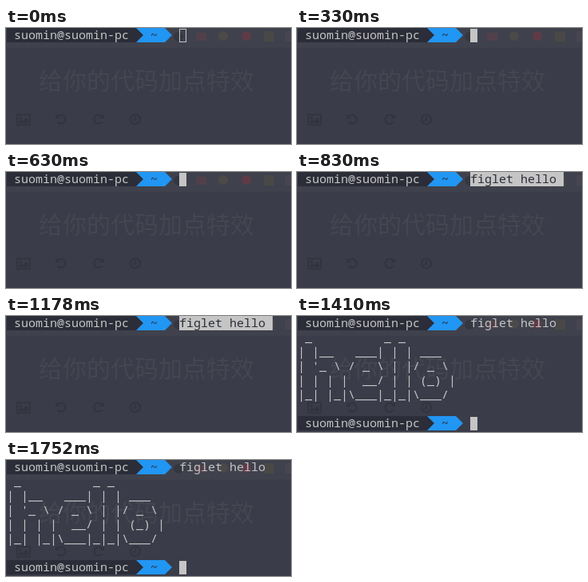
Animation of 357 by 146 pixels, one loop 1980 ms. Source, as an HTML page with a canvas:

```html
<!DOCTYPE html>
<html lang="zh">
<head>
<meta charset="utf-8">
<title>Terminal</title>
<style>
html, body { margin: 0; width: 100%; height: 100%; overflow: hidden; background: #3a3c49; }
canvas { display: block; }
</style>
</head>
<body>
<canvas id="stage" width="357" height="146"></canvas>
<script>
const ctx = document.getElementById('stage').getContext('2d');
const LOOP = 1980;
const CELL = 9, ROW = 18, LEFT = 1;
const MONO = '300 15px "Noto Sans Mono", monospace';
const FG = '#c5c5c5', BG = '#3a3c49', DARK = '#2b2d38', BLUE = '#2196f3';
const FAINT = '#444651', ICON = '#32343f';
const COMMAND = 'figlet hello';
const BANNER = [
  ' _          _ _',
  '| |__   ___| | | ___',
  "| '_ \\ / _ \\ | |/ _ \\",
  '| | | |  __/ | | (_) |',
  '|_| |_|\\___|_|_|\\___/'
];

const colX = col => LEFT + col * CELL;

function rect(x, y, w, h, color) {
  ctx.fillStyle = color;
  ctx.fillRect(x, y, w, h);
}

function disc(x, y, r, color) {
  ctx.fillStyle = color;
  ctx.beginPath();
  ctx.arc(x, y, r, 0, Math.PI * 2);
  ctx.fill();
}

function poly(color, ...points) {
  ctx.fillStyle = color;
  ctx.beginPath();
  points.forEach(([x, y]) => ctx.lineTo(x, y));
  ctx.fill();
}

// One character per terminal cell
function type(text, col, row, color = FG) {
  ctx.font = MONO;
  ctx.fillStyle = color;
  [...text].forEach((ch, i) => {
    if (ch !== ' ') ctx.fillText(ch, colX(col + i), row * ROW + 14);
  });
}

function arrow(col, y, color) {
  const x = colX(col);
  poly(color, [x, y], [x + CELL, y + ROW / 2], [x, y + ROW]);
}

function prompt(row) {
  const y = row * ROW;
  rect(LEFT, y, 18 * CELL, ROW, DARK);
  rect(colX(18), y, 4 * CELL, ROW, BLUE);
  arrow(18, y, DARK);
  arrow(22, y, BLUE);
  type('suomin@suomin-pc', 1, row);
  type('~', 20, row, DARK);
}

function cursor(col, row, solid) {
  const x = colX(col), y = row * ROW + 1;
  if (solid) {
    rect(x, y, CELL, ROW - 1, FG);
  } else {
    ctx.strokeStyle = FG;
    ctx.lineWidth = 1;
    ctx.strokeRect(x + 0.5, y + 0.5, CELL - 1, ROW - 2);
  }
}

function pictureIcon(x, y) {
  ctx.strokeRect(x - 8, y - 6, 16, 13);
  disc(x - 4, y - 2, 1.7, ICON);
  poly(ICON, [x - 6, y + 5], [x - 6, y + 3], [x - 3, y], [x - 1, y + 2],
    [x + 3, y - 2], [x + 6, y + 1], [x + 6, y + 5]);
}

function turnIcon(x, y, dir) {
  ctx.save();
  ctx.translate(x, y);
  ctx.scale(dir, 1);
  ctx.beginPath();
  ctx.arc(0, 0, 5.5, -2.5, 2.5);
  ctx.stroke();
  poly(ICON, [-7, -7], [-7, -1], [-1, -1]);
  ctx.restore();
}

function clockIcon(x, y) {
  ctx.beginPath();
  ctx.arc(x, y, 6, 0, Math.PI * 2);
  ctx.moveTo(x, y - 4);
  ctx.lineTo(x, y + 1);
  ctx.lineTo(x - 3, y + 1);
  ctx.stroke();
}

// Page showing faintly through the translucent terminal
function backdrop() {
  rect(0, 0, 357, 146, BG);
  rect(0, 0, 357, 25, '#3f414d');
  disc(216, 11, 6, '#343640');
  rect(238, 6, 13, 10, '#51404a');
  disc(272, 10, 6, '#4c4a48');
  disc(301, 10, 6, '#603b47');
  rect(323, 4, 13, 13, '#4a4847');
  rect(350, 4, 7, 13, '#474650');

  ctx.font = '30px "Noto Sans CJK SC", "Noto Sans CJK", sans-serif';
  ctx.fillStyle = FAINT;
  ctx.fillText('给你的代码加点特效', 41, 77);

  ctx.strokeStyle = ICON;
  ctx.lineWidth = 2;
  pictureIcon(22, 115);
  turnIcon(69, 115, 1);
  turnIcon(116, 115, -1);
  clockIcon(162, 115);
}

function draw(t) {
  backdrop();
  prompt(0);
  if (t < 830) {
    cursor(24, 0, t >= 330);
  } else if (t < 1410) {
    rect(colX(24), 0, 13 * CELL, ROW, FG);
    type(COMMAND, 24, 0, DARK);
  } else {
    type(COMMAND, 24, 0);
    BANNER.forEach((line, i) => type(line, 0, i + 1));
    prompt(7);
    cursor(24, 7, true);
  }
}

const start = performance.now();
function tick() {
  draw((performance.now() - start) % LOOP);
  requestAnimationFrame(tick);
}
tick();
</script>
</body>
</html>
```
